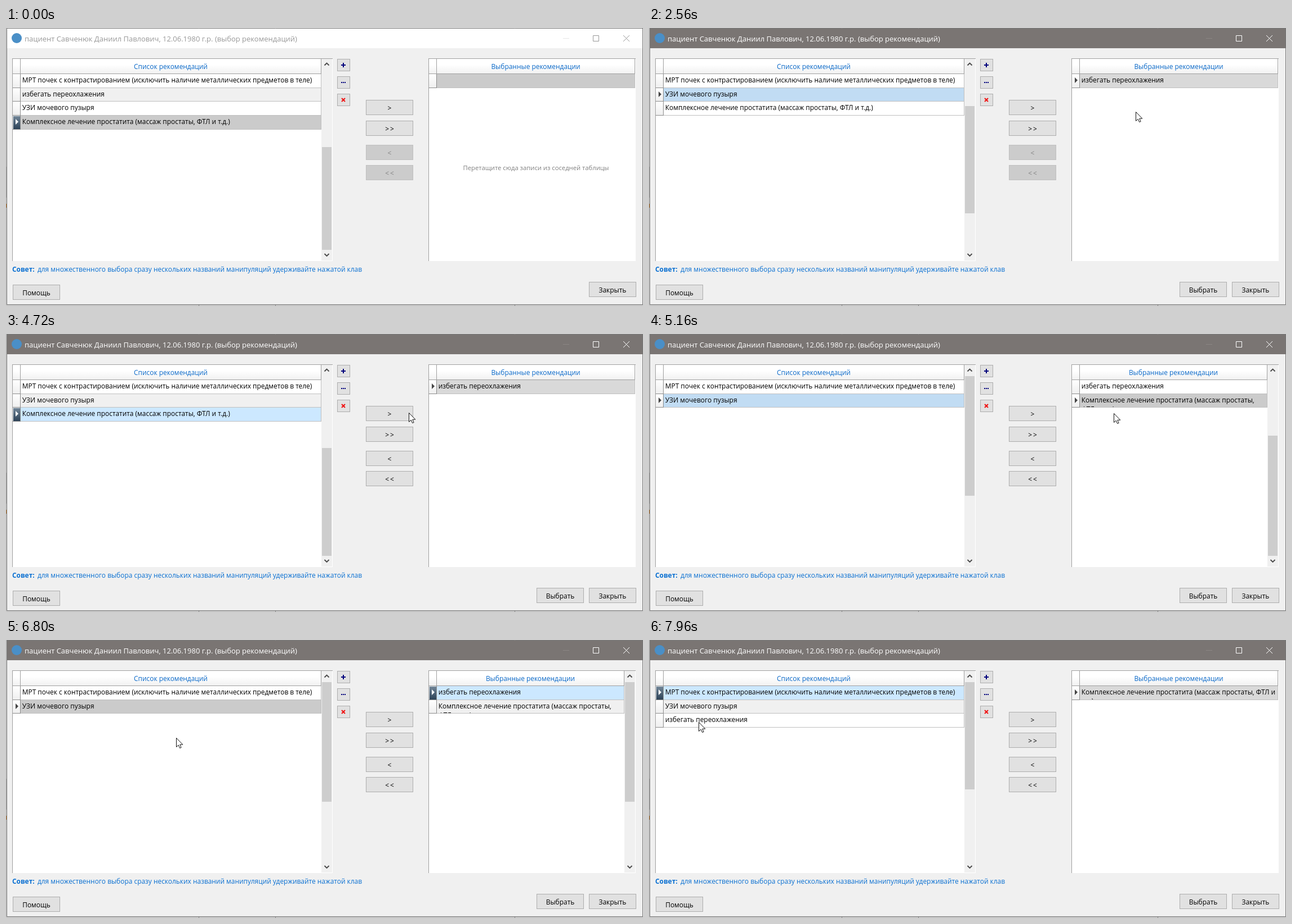
An HTML page that plays this animation: 1131x495 px, repeating every 8 s.

```html
<!DOCTYPE html>
<html lang="ru">
<head>
<meta charset="utf-8">
<title>Выбор рекомендаций</title>
<style>
html, body { margin: 0; width: 100%; height: 100%; overflow: hidden; }
body { background: #ccc; }
#stage {
  position: relative; width: 1131px; height: 495px; overflow: hidden;
  background: #c8c8c8; color: #000;
  font: 11.93px/16px "Open Sans", "Noto Sans", sans-serif;
}
#stage div, #stage svg { position: absolute; box-sizing: border-box; white-space: pre; }
#win { left: 1px; top: 0; width: 1130px; height: 493px; background: #f0f0f0; border: 1px solid #777; }
#bar { left: 2px; top: 1px; width: 1128px; height: 35px; background: #fff; color: #999; }
#bar.active { background: #7a7573; color: #fff; }
#bar .name { left: 31px; top: 8px; font-size: 13px; line-height: 20px; }
#bar .min { stroke: #e6e6e6; }
#bar.active .min { stroke: #8b8684; }
.icon { left: 8px; top: 8px; width: 18px; height: 18px; border-radius: 50%; background: #4a8fc7; }
.mark { width: 1px; background: #888; }
.btn { background: #e1e1e1; border: 1px solid #adadad; text-align: center; }
.btn.off { background: #ccc; border-color: #bfbfbf; color: #838383; }
.move { letter-spacing: 2px; text-indent: 2px; }
.grid { background: #fff; border: 1px solid #a0a0a0; border-width: 1px 0 0 1px; }
.head { background: linear-gradient(#fff 40%, #f1f1f1); border: 1px solid #a0a0a0; border-width: 0 1px 1px 0; }
.title { color: #0a69c9; line-height: 26px; text-align: center; }
.cell { padding: 2px 0 0 2.7px; border: 1px solid #c0c0c0; border-width: 0 1px 1px 0; overflow: hidden; }
.ind { background: linear-gradient(#fff, #efefef); border: 1px solid #8c8c8c; border-width: 0 1px 1px 0; }
.ind.dark { background: linear-gradient(#74889a, #2c4257); box-shadow: inset 1px 1px #dfe4e8; }
.tri { left: 5px; top: 6px; border: 5px solid transparent; border-left-color: #444; border-right-width: 0; }
.dark .tri { border-left-color: #fff; }
.track { background: #f0f0f0; }
.thumb { background: #cdcdcd; }
.tip { left: 11px; top: 421px; color: #0a70d2; }
.hint { left: 751px; top: 241px; width: 380px; text-align: center; color: #808080; font-size: 11.25px; }
#halo { width: 28px; height: 28px; margin: -14px; border-radius: 50%; background: rgba(235, 238, 60, .7); }
</style>
</head>
<body>
<div id="stage">
  <div class="mark" style="left:0;top:247px;height:55px;background:#aaa"></div>
  <div class="mark" style="left:0;top:313px;height:7px;background:#b8772f"></div>
  <div id="win"></div>
  <div id="bar">
    <div class="icon"></div>
    <div class="name">пациент Савченюк Даниил Павлович, 12.06.1980 г.р. (выбор рекомендаций)</div>
    <svg style="left:980px;top:5px" width="140" height="26" fill="none" stroke="currentColor">
      <path class="min" d="M7 12.5H18"/>
      <path d="M60.500 7.500h10v10h-10zM114 7l11 11M125 7l-11 11"/>
    </svg>
  </div>
  <div id="fixed"></div>
  <div id="left"></div>
  <div id="right"></div>
  <div class="tip"><b>Совет:</b></div>
  <div class="tip" style="left:56px">для множественного выбора сразу нескольких названий манипуляций удерживайте нажатой клав</div>
  <div id="halo"></div>
  <svg id="cursor" width="14" height="21" viewBox="-.5 -.5 14 21">
    <path d="M0 0V16L3.700 12.600 6.100 18 8.600 17 6.300 11.700H11.300Z" fill="#fff" stroke="#111"/>
  </svg>
</div>
<script>
const LOOP = 8000;
const $ = id => document.getElementById(id);

const MRI = "МРТ почек с контрастированием (исключить наличие металлических предметов в теле)";
const COLD = "избегать переохлажения";
const SCAN = "УЗИ мочевого пузыря";
const CARE = "Комплексное лечение простатита (массаж простаты, ФТЛ и т.д.)";
const GREY = "#cbcbcb", PALE = "#d9d9d9", BLUE = "#c1dcf3", LIGHT = "#cce8ff";

// moments of clicks and drops
const CLICK1 = 1280, DROP1 = 2480, CLICK2 = 3480, DROP2 = 4920;
const CLICK3 = 5720, DROP3 = 6880, CLICK4 = 7800;

// thumb: [top, bottom]
const leftStates = [
  { at: 0, rows: [MRI, COLD, SCAN, CARE], sel: 3, fill: GREY, dark: true, thumb: [212, 395] },
  { at: CLICK1, rows: [MRI, COLD, SCAN, CARE], sel: 1, fill: BLUE, dark: true, thumb: [120, 303] },
  { at: DROP1, rows: [MRI, SCAN, CARE], sel: 1, fill: BLUE, thumb: [139, 330] },
  { at: CLICK2, rows: [MRI, SCAN, CARE], sel: 2, fill: LIGHT, dark: true, thumb: [203, 395] },
  { at: DROP2, rows: [MRI, SCAN], sel: 1, fill: BLUE, thumb: [75, 288] },
  { at: CLICK3, rows: [MRI, SCAN], sel: 1, fill: GREY, thumb: [75, 288] },
  { at: DROP3, rows: [MRI, SCAN, COLD], sel: 2, fill: GREY, thumb: [203, 395] },
  { at: CLICK4, rows: [MRI, SCAN, COLD], sel: 0, fill: LIGHT, dark: true, thumb: [75, 266] }
];
const rightStates = [
  { at: 0, rows: [""], sel: 0, fill: GREY, empty: true },
  { at: 1360, rows: [""], sel: 0, fill: PALE, empty: true },
  { at: DROP1, rows: [COLD], sel: 0, fill: PALE },
  { at: DROP2, rows: [COLD, CARE], sel: 1, fill: GREY, thumb: [181, 395] },
  { at: CLICK3, rows: [COLD, CARE], sel: 0, fill: LIGHT, dark: true, thumb: [75, 288] },
  { at: DROP3, rows: [CARE], sel: 0, fill: BLUE },
  { at: CLICK4, rows: [CARE], sel: 0, fill: PALE }
];
const buttonStates = [
  { at: 0 },
  { at: DROP1, pick: true },
  { at: CLICK2, pick: true, back: true }
];

// cursor stops: [time, x, y]
const path = [
  [440, 584, 444], [1200, 249, 127], [1360, 249, 127], [1720, 262, 124],
  [1920, 262, 124], [2480, 860, 147], [2560, 864, 149], [2720, 841, 156],
  [2800, 841, 156], [3440, 311, 152], [3600, 311, 152], [3840, 272, 137],
  [3980, 272, 137], [4080, 285, 146], [4240, 285, 146], [4920, 828, 139],
  [5140, 825, 141], [5520, 800, 98], [5720, 800, 98], [6080, 790, 100],
  [6280, 790, 100], [6780, 302, 174], [6880, 302, 174], [7080, 298, 166],
  [7160, 298, 166], [7740, 88, 94], [7800, 88, 94], [7950, 88, 146]
];
const presses = [[CLICK1, 1400], [CLICK2, 3560], [CLICK3, 5800], [CLICK4, 7880]];

function box(cls, x, y, w, h, inner = "", style = "") {
  return `<div class="${cls}" style="left:${x}px;top:${y}px;width:${w}px;height:${h}px;${style}">${inner}</div>`;
}

function button(x, y, label, cls = "") {
  return box("btn " + cls, x, y, 84, 27, label, "line-height:26px");
}

function mover(y, label, off) {
  return button(639, y, label, off ? "move off" : "move");
}

function glyph(y, color, d) {
  const svg = `<svg style="left:4px;top:4px" width="12" height="12" fill="none" stroke="${color}" stroke-width="2"><path d="${d}"/></svg>`;
  return box("btn", 588, y, 23, 22, svg);
}

function scrollbar(x, [top, bottom]) {
  const arrow = (y, d) =>
    `<svg style="left:${x + 4}px;top:${y}px" width="11" height="8" fill="none" stroke="#484848" stroke-width="1.8"><path d="${d}"/></svg>`;
  return box("track", x, 55, 19, 359) + box("thumb", x + 1, top, 17, bottom - top) +
    arrow(60, "M1.500 6.500L5.500 2.500 9.500 6.500") + arrow(400, "M1.500 2L5.500 6 9.500 2");
}

const rowTop = i => 82 + Math.round(i * 24.7);

function wrap(text, width) {
  return width < 340 ? text.replace("простаты, ", "простаты,\n") : text.replace("ФТЛ и ", "ФТЛ и\n");
}

function table(x, end, heading, s, narrow) {
  const right = s.thumb ? end - 19 : end;
  const cellX = x + 15, width = right - cellX;
  let html = box("grid", x, 54, end - x + 1, 361) +
    box("head", x + 1, 55, 14, 27) + box("head title", cellX, 55, width, 27, heading);
  s.rows.forEach((text, i) => {
    const y = rowTop(i), h = rowTop(i + 1) - y, on = i === s.sel;
    const fill = on ? s.fill : i % 2 ? "#f0f0f0" : "#fff";
    html += box(on && s.dark ? "ind dark" : "ind", x + 1, y, 14, h,
      on && !s.empty ? '<div class="tri"></div>' : "");
    html += box("cell", cellX, y, width, h, narrow ? wrap(text, width) : text, "background:" + fill);
  });
  if (s.thumb) html += scrollbar(right, s.thumb);
  if (s.empty) html += '<div class="hint">Перетащите сюда записи из соседней таблицы</div>';
  return html;
}

function buttons(s) {
  return [342, 478, 903].map(x => box("mark", x, 0, 1, 1) + box("mark", x, 493, 1, 2)).join("") +
    glyph(55, "#00007c", "M2 6h8M6 2v8") +
    glyph(86, "#00007c", "M2 6h2m1 0h2m1 0h2") +
    glyph(117, "#f01010", "M3 3l6 6M9 3l-6 6") +
    mover(128, "&gt;") +
    mover(165, "&gt;&gt;") +
    mover(208, "&lt;", !s.back) +
    mover(244, "&lt;&lt;", !s.back) +
    button(12, 457, "Помощь") +
    (s.pick ? button(942, 452, "Выбрать") : "") +
    button(1035, 452, "Закрыть");
}

const parts = [
  { el: $("left"), states: leftStates, draw: s => table(11, 579, "Список рекомендаций", s) },
  { el: $("right"), states: rightStates, draw: s => table(750, 1117, "Выбранные рекомендации", s, true) },
  { el: $("fixed"), states: buttonStates, draw: buttons }
];

function cursorAt(t) {
  const n = path.findIndex(p => p[0] > t);
  if (n < 1) return path[path.length - 1].slice(1);
  const [t0, x0, y0] = path[n - 1], [t1, x1, y1] = path[n];
  const k = (t - t0) / (t1 - t0), e = k * k * (3 - 2 * k);
  return [x0 + (x1 - x0) * e, y0 + (y1 - y0) * e];
}

function render(t) {
  for (const p of parts) {
    const s = p.states.filter(s => s.at <= t).pop();
    if (s !== p.now) {
      p.now = s;
      p.el.innerHTML = p.draw(s);
    }
  }
  $("bar").classList.toggle("active", t >= CLICK1);
  const [x, y] = cursorAt(t).map(Math.round);
  const move = `translate(${x}px, ${y}px)`;
  $("cursor").style.cssText = `left:0;top:0;transform:${move};display:${t < path[0][0] ? "none" : "block"}`;
  const down = presses.some(([a, b]) => t >= a && t < b);
  $("halo").style.cssText = `left:0;top:0;transform:${move};display:${down ? "block" : "none"}`;
}

const start = performance.now();
function tick() {
  const t = (performance.now() - start) % LOOP;
  render(Math.floor(t / 40) * 40);
  requestAnimationFrame(tick);
}
tick();
</script>
</body>
</html>
```
